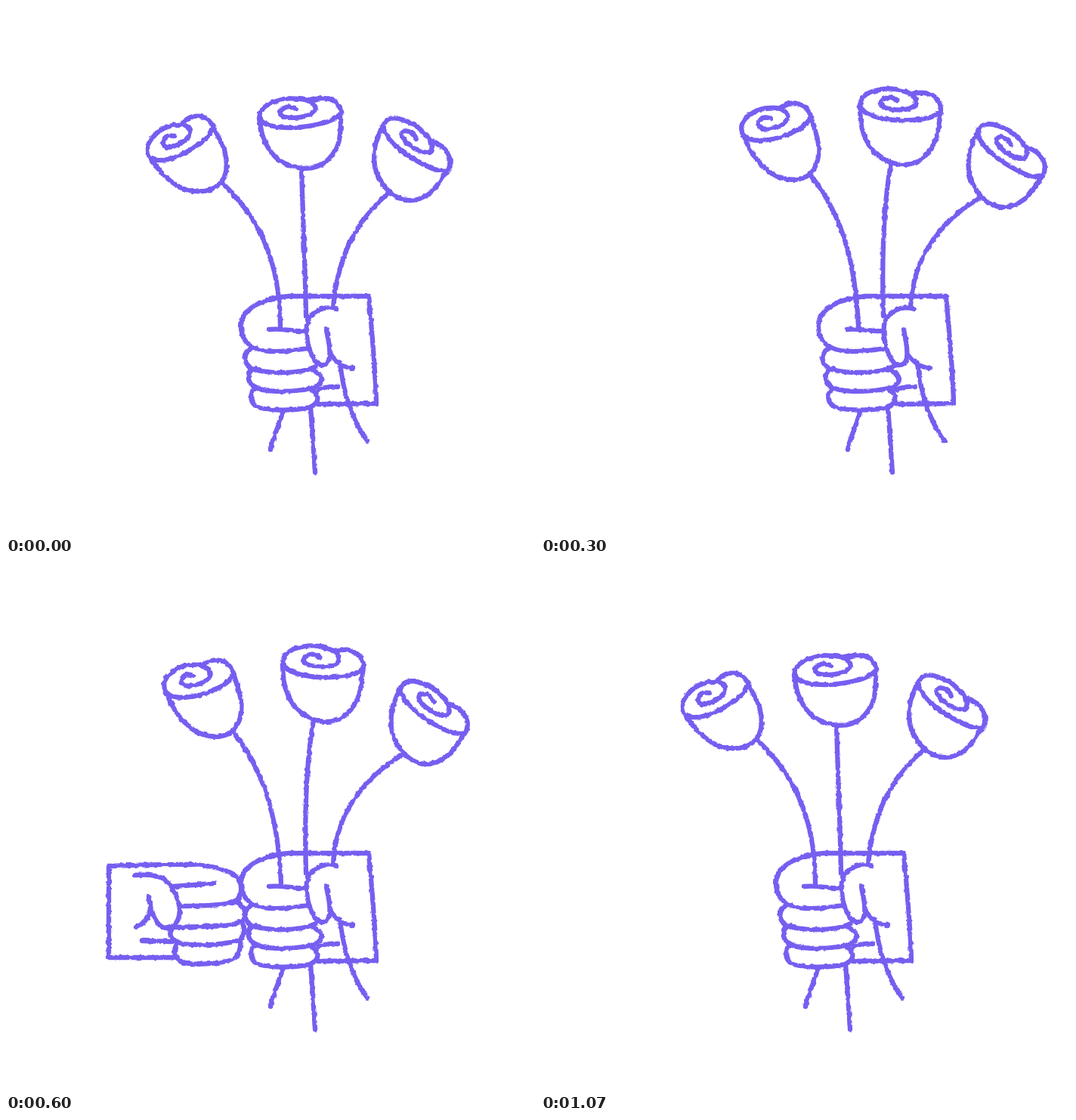
An HTML page for the animation above (1100 ms loop, 700x700 px).

```html
<!DOCTYPE html>
<html lang="en">
<head>
<meta charset="utf-8">
<title>Bouquet fist bump</title>
<style>
html, body { margin: 0; width: 100%; height: 100%; overflow: hidden; background: #fff; }
svg { display: block; width: 100vw; height: 100vh; }
path { vector-effect: non-scaling-stroke; }
</style>
</head>
<body>
<svg viewBox="0 0 700 700">
  <filter id="crayon" filterUnits="userSpaceOnUse" x="0" y="0" width="700" height="700" color-interpolation-filters="sRGB">
    <feTurbulence type="fractalNoise" baseFrequency=".16" numOctaves="2" seed="4"/>
    <feDisplacementMap in="SourceGraphic" scale="4" xChannelSelector="R" yChannelSelector="G"/>
  </filter>
  <g filter="url(#crayon)"><g id="art" fill="none" stroke="#765ef0" stroke-width="6.3" stroke-linecap="round" stroke-linejoin="round"></g></g>
</svg>
<script>
const art = document.getElementById('art');
const path = (d, extra = '') => `<path d="${d}" ${extra}/>`;
const shifted = (dx, dy, inner) => `<g transform="translate(${dx} ${dy})">${inner}</g>`;

// Smooth curve through a flat list of points
function curve(n) {
  const p = [];
  for (let i = 0; i < n.length; i += 2) p.push([n[i] / 100, n[i + 1] / 100]);
  const at = i => p[Math.max(0, Math.min(p.length - 1, i))];
  let d = 'M' + p[0];
  for (let i = 0; i < p.length - 1; i++) {
    const [a, b, c, e] = [at(i - 1), at(i), at(i + 1), at(i + 2)];
    const c1 = b.map((v, k) => v + (c[k] - a[k]) / 6);
    const c2 = c.map((v, k) => v - (e[k] - b[k]) / 6);
    d += `C${c1} ${c2} ${c}`;
  }
  return d;
}

// Unit rose: x runs along the rim, y from the rim's middle to the base
const rose =
  curve([0, 2, 3, -12, 14, -23, 37, -30, 62, -23, 70, -8, 63, 2, 47, 6, 31, 3, 26, -5, 30, -12, 38, -15, 46, -10]) +
  curve([61, -23, 80, -26, 95, -17, 101, 0, 98, 8, 84, 18, 52, 24, 27, 22, 8, 14, 0, 2]) +
  curve([0, 4, 6, 46, 23, 82, 52, 100, 79, 92, 97, 57, 101, 6]);

function flower(s) {
  const [lx, ly, rx, ry, bx, by] = s.split(' ').map(Number);
  const m = [rx - lx, ry - ly, bx - (lx + rx) / 2, by - (ly + ry) / 2, lx, ly];
  return path(rose, `transform="matrix(${m})"`);
}

const bouquet = ({ roses, stems, ends }) => roses.split(',').map(flower).join('') + path(stems) + path(ends);

// Roses are given as rim left, rim right, base
const restEnds = 'M366 537C362 555 353 570 350 587M403 530C405 560 407 590 409 617M442 472C446 510 458 550 478 575M413 508C422 504 430 503 439 504';
const rest = {
  roses: '189 198 271 156 268 244,335 147 442 139 391 215,500 155 585 214 506 245',
  stems: 'M288 236C325 272 363 325 363 424M391 215C393 280 396 350 397 410M505 248C465 285 440 325 433 398',
  ends: restEnds
};
const lag = {
  roses: '229 216 314 157 315 239,350 147 457 131 417 210,518 148 612 187 538 242',
  stems: 'M331 233C375 275 413 330 417 424M425 210C440 280 448 350 449 410M536 243C505 295 492 340 487 398',
  ends: 'M419 540C412 557 398 571 379 577M457 531C458 565 448 590 430 609M489 470C490 500 489 540 488 571M467 507C478 505 488 502 500 500'
};
const hit = {
  roses: '285 183 384 171 341 242,446 141 535 181 463 220,594 227 638 303 554 297',
  stems: 'M341 242C332 310 333 350 343 420M461 222C410 290 388 350 381 415M552 300C490 305 435 345 413 400',
  ends: 'M364 537C369 560 377 580 385 602M391 508C396 555 413 585 435 604M413 470C420 520 440 560 486 565M390 508L429 507'
};
const recoil = {
  roses: '147 244 230 183 234 270,303 160 402 144 370 229,448 161 548 187 482 246',
  stems: 'M247 266C290 300 330 355 347 418M371 230C383 290 386 350 385 418M476 247C465 310 450 360 426 397',
  ends: 'M358 537C357 565 353 585 344 600M393 533L395 617M421 472C432 505 440 550 444 589M402 516C411 507 421 504 435 505'
};
const swing = {
  roses: '210 168 299 143 281 230,366 130 472 136 413 209,523 163 608 222 528 254',
  stems: 'M300 223C338 270 360 330 364 424M407 208C396 270 395 340 397 410M524 254C465 290 436 340 433 398',
  ends: restEnds
};

// Halfway between two bouquets of the same structure
function between(a, b) {
  const out = {};
  for (const k in a) {
    const n = b[k].match(/\d+/g);
    let i = 0;
    out[k] = a[k].replace(/\d+/g, v => (+v + +n[i++]) / 2);
  }
  return out;
}

const hand = path('M480 384L374 384C345 386 311 398 311 424C311 446 328 456 350 457C370 458 385 455 399 453' +
  'M480 384C484 430 489 480 490 526L414 527M349 428C365 426 380 431 396 430' +
  'M327 452C318 456 315 462 317 470C320 482 340 485 365 485C385 485 400 482 410 477' +
  'M330 479C318 484 318 496 328 504C340 511 370 511 392 508C410 506 418 499 418 494C418 488 410 484 405 481' +
  'M330 506C322 512 322 524 332 530C345 536 375 535 392 533C408 531 414 524 412 516C411 512 409 510 405 509' +
  'M437 401C420 396 402 404 398 422C396 440 402 462 411 472C418 478 426 475 428 466C430 452 426 440 424 428' +
  'M429 460C436 470 446 479 459 479');

const hitHand = path('M453 384C400 389 350 391 315 397C290 402 279 415 280 430C282 447 296 456 312 457L385 455' +
  'M453 384C456 430 459 480 462 527L390 530M317 425L376 424' +
  'M295 451C288 458 288 472 298 480C315 487 360 486 380 484C390 481 392 476 388 470' +
  'M299 481C290 487 291 500 301 505C320 510 360 510 378 507C390 503 393 494 387 483' +
  'M301 506C296 514 299 526 309 531C325 536 360 537 375 534C388 530 391 520 388 508' +
  'M414 402C397 401 382 410 380 430C381 450 388 466 396 472C404 476 410 470 411 460C412 448 409 438 407 429' +
  'M411 452C416 464 424 476 432 482');

const recoilHand = path('M467 383L360 383C325 387 296 397 295 422C296 445 312 456 345 457L398 454' +
  'M467 383L476 532L400 533M332 424L388 424' +
  'M308 451C299 458 299 470 308 479C325 489 370 490 395 486C404 483 406 478 405 472' +
  'M316 485C310 492 312 502 321 505C340 511 375 510 392 507C408 502 412 492 404 483' +
  'M320 508C312 517 314 528 324 533C345 537 375 537 392 533C405 528 408 518 402 508' +
  'M433 402C413 396 392 408 390 428C391 446 400 465 410 471C417 474 421 468 421 458C421 448 418 440 415 430' +
  'M420 455C425 468 434 480 447 483');

const fist = path('M221 522L136 522L136 401C170 400 210 398 245 399C275 400 304 408 310 422C313 436 310 446 300 449C285 453 255 454 230 454' +
  'M222 428L275 424M306 448C316 455 319 465 314 472C305 480 285 481 265 481L224 482' +
  'M311 474C317 482 317 492 308 499C292 505 255 507 235 504C220 501 214 494 219 483' +
  'M310 499C311 508 309 520 300 525C280 531 250 532 235 529C222 525 221 513 226 504' +
  'M171 413C185 412 200 413 208 418C220 426 229 444 230 460C229 475 222 483 212 483C198 482 193 463 188 441' +
  'M191 450C192 465 185 478 172 481M181 500L220 501');

const bump = dx => shifted(dx, 0, fist);
const still = bouquet(rest) + hand;

// Start time in ms and drawing
const steps = [
  [0, still],
  [100, bouquet(between(rest, lag)) + shifted(26, 0, hand)],
  [200, bouquet(lag) + shifted(52, 0, hand)],
  [300, shifted(56, 0, bouquet(swing) + hand)],
  [400, bouquet(hit) + hitHand + bump(-31)],
  [500, bouquet(recoil) + recoilHand + bump(-18)],
  [600, bouquet(swing) + hand + bump(0)],
  [700, bouquet(between(swing, rest)) + hand + bump(0)],
  [800, still + bump(0)],
  [970, still + bump(-30)],
  [1070, still]
];

let shown;
function draw() {
  const t = performance.now() % 1100;
  const step = steps.findLast(([start]) => start <= t);
  if (step !== shown) art.innerHTML = (shown = step)[1];
  requestAnimationFrame(draw);
}
draw();
</script>
</body>
</html>
```
